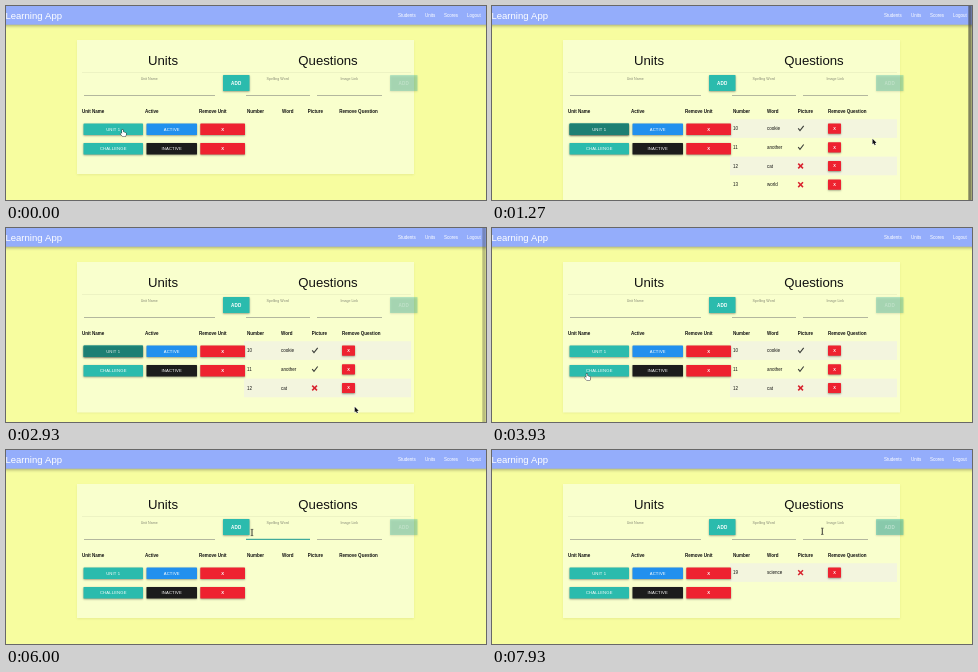
Recreate the animation shown at these times as an HTML page with a canvas. Size 480 px wide and 194 px high, loop 8000 ms.

```html
<!DOCTYPE html>
<html lang="en">
<head>
<meta charset="utf-8">
<title>Learning App</title>
<style>
html, body { margin: 0; width: 100%; height: 100%; overflow: hidden; background: #f7fd9f; }
canvas { display: block; width: 480px; height: 194px; }
</style>
</head>
<body>
<canvas id="stage"></canvas>
<script>
const LOOP = 8000;
const FONT = '"Liberation Sans", Arial, sans-serif';
const TEAL = '#2bbbad', DARK_TEAL = '#1d7f73', RED = '#ee2230', BLUE = '#2290ee', BLACK = '#1c1c1c';

const canvas = document.getElementById('stage');
const ratio = Math.max(1, window.devicePixelRatio || 1);
canvas.width = 480 * ratio;
canvas.height = 194 * ratio;
const ctx = canvas.getContext('2d');

const clamp = v => Math.min(1, Math.max(0, v));
const ramp = (t, from, to) => clamp((t - from) / (to - from));
const ease = k => k * k * (3 - 2 * k);

function rect(x, y, w, h, fill) {
  ctx.fillStyle = fill;
  ctx.fillRect(x, y, w, h);
}

function text(str, x, y, size, { color = '#111', bold = false, align = 'left', spacing = 0 } = {}) {
  ctx.font = `${bold ? 'bold ' : ''}${size}px ${FONT}`;
  ctx.letterSpacing = spacing + 'px';
  ctx.textAlign = align;
  ctx.fillStyle = color;
  ctx.fillText(str, x, y);
}

function line(points, color, width) {
  ctx.beginPath();
  points.forEach(([x, y]) => ctx.lineTo(x, y));
  ctx.strokeStyle = color;
  ctx.lineWidth = width;
  ctx.stroke();
}

function shadowed(color, blur, dy, draw) {
  ctx.save();
  ctx.shadowColor = color;
  ctx.shadowBlur = blur * ratio;
  ctx.shadowOffsetY = dy * ratio;
  draw();
  ctx.restore();
}

function button(label, x, y, w, h, fill, { bold = false, size = 4.2, glow = 0 } = {}) {
  shadowed('rgba(0,0,0,.4)', 2, 0.8, () => {
    ctx.fillStyle = fill;
    ctx.beginPath();
    ctx.roundRect(x, y, w, h, 0.6);
    ctx.fill();
  });
  if (glow) rect(x, y, w, h, `rgba(255,255,255,${glow})`);
  text(label, x + w / 2, y + h / 2 + size * 0.36, size, { color: '#fff', bold, align: 'center', spacing: 0.15 });
}

// A color overlay blends between the resting and the focused button
function unitButton(label, y, focus) {
  button(label, 77.5, y, 59.5, 11.5, TEAL);
  if (!focus) return;
  ctx.save();
  ctx.globalAlpha = focus;
  button(label, 77.5, y, 59.5, 11.5, DARK_TEAL);
  ctx.restore();
}

function drawNav() {
  shadowed('rgba(0,0,0,.3)', 3, 1, () => rect(-10, -10, 500, 28.7, '#94adfb'));
  text('Learning App', -0.5, 12.7, 9.5, { color: '#fff' });
  [['Students', 392], ['Units', 419], ['Scores', 438], ['Logout', 461]]
    .forEach(([label, x]) => text(label, x, 11, 4.53, { color: '#fff' }));
}

function drawForm(t) {
  text('Units', 157, 58.5, 13.2, { align: 'center' });
  text('Questions', 322, 58.5, 13.2, { align: 'center' });
  rect(76, 66, 329, 0.7, 'rgba(0,0,0,.07)');

  [['Unit Name', 143.2, 78, 209], ['Spelling Word', 271.7, 240, 304], ['Image Link', 343.3, 311, 376]]
    .forEach(([label, center, from, to]) => {
      text(label, center, 74, 3.6, { color: '#858875', align: 'center' });
      rect(from, 89, to - from, 0.7, '#96998a');
    });

  if (t >= 5300 && t < 7500) rect(240, 88.8, 64, 1, '#26a69a');
  if (t < 7870) text('science'.slice(0, Math.ceil(ramp(t, 6030, 6470) * 7)), 240.3, 84, 4.53);

  button('ADD', 217, 69, 26.5, 16, TEAL, { bold: true, size: 4.6 });
  ctx.save();
  ctx.globalAlpha = 0.3 + 0.7 * (ramp(t, 6730, 7000) - ramp(t, 7850, 7950));
  const pressed = t > 7470 && t < 7640 ? 0.25 : 0;
  button('ADD', 384, 69, 27.5, 16, TEAL, { bold: true, size: 4.6, glow: pressed });
  ctx.restore();
}

function drawUnits(t) {
  const unitFocus = ramp(t, 390, 530) - ramp(t, 2900, 3070);
  const challengeFocus = ramp(t, 4130, 4260) - ramp(t, 5270, 5420);
  unitButton('UNIT 1', 117.5, unitFocus);
  unitButton('CHALLENGE', 137, challengeFocus);
  button('ACTIVE', 140.5, 117.5, 50.5, 11.5, BLUE);
  button('INACTIVE', 140.5, 137, 50.5, 11.5, BLACK);
  [117.5, 137].forEach(y => button('X', 194.3, y, 44.7, 11.5, RED, { bold: true }));
}

function questionsAt(t) {
  if (t >= 7870) return [[19, 'science', false]];
  if (t < 470 || t >= 4530) return [];
  const rows = [[10, 'cookie', true], [11, 'another', true], [12, 'cat', false], [13, 'world', false]];
  return t < 2930 ? rows : rows.slice(0, 3);
}

function drawQuestions(t, rows) {
  const columns = rows.length ? [241, 275, 305.7, 336] : [241, 276, 301.7, 333.3];
  ['Unit Name', 'Active', 'Remove Unit', 'Number', 'Word', 'Picture', 'Remove Question']
    .forEach((label, i) => text(label, [76, 139, 193, ...columns][i], 107, 4.53, { bold: true }));

  rows.forEach(([number, word, hasPicture], i) => {
    const y = 122.6 + i * 18.7;
    if (i % 2 === 0) rect(238, y - 9.4, 167, 18.7, '#f3f5de');
    text(number, 241, y + 1.6, 4.53);
    text(word, 275, y + 1.6, 4.53);
    if (hasPicture) {
      line([[306.2, y - 0.2], [308, y + 2.1], [311.7, y - 2.8]], '#3c3f3a', 1.1);
    } else {
      line([[306.2, y - 2.4], [311, y + 2.4]], '#d8232f', 1.5);
      line([[311, y - 2.4], [306.2, y + 2.4]], '#d8232f', 1.5);
    }
    const clicked = i === 3 && t > 2200 ? 0.3 * (1 - ramp(t, 2270, 2530)) : 0;
    button('X', 336, y - 5.1, 13, 10.2, RED, { bold: true, size: 3.9, glow: clicked });
  });
}

// Pointer stops: time, x, y
const path = [
  [0, 116, 123.5], [470, 116, 123.5], [1270, 380.5, 132.7], [2070, 348.7, 178.7], [3250, 348.7, 178.7],
  [3930, 94.3, 145.5], [4470, 94.3, 145.5], [4800, 257, 88], [5130, 246, 82.5], [6700, 246, 82.5],
  [7200, 398, 77], [7850, 398, 77], [7925, 330.3, 81.3], [8000, 330.3, 81.3]
];
// Pointer shapes, each from its start time
const shapes = [
  [0, 'hand'], [530, 'arrow'], [3870, 'hand'], [4540, 'arrow'], [4730, 'beam'],
  [6800, 'arrow'], [7100, 'hand'], [7870, 'beam']
];

function outline(points, fill, stroke) {
  ctx.beginPath();
  points.forEach(([x, y]) => ctx.lineTo(x, y));
  ctx.closePath();
  ctx.lineWidth = 0.9;
  ctx.strokeStyle = stroke;
  ctx.stroke();
  ctx.fillStyle = fill;
  ctx.fill();
}

function drawPointer(t) {
  const i = path.findIndex(stop => t < stop[0]);
  const [t0, x0, y0] = path[i - 1], [t1, x1, y1] = path[i];
  const k = ease(ramp(t, t0, t1));
  const shape = shapes.filter(([start]) => t >= start).pop()[1];
  ctx.save();
  ctx.lineJoin = 'round';
  ctx.translate(x0 + (x1 - x0) * k, y0 + (y1 - y0) * k);
  if (shape === 'arrow') {
    outline([[0, 0], [0, 5.6], [1.3, 4.5], [2.2, 6.6], [3.2, 6.1], [2.3, 4.2], [4, 4]], '#111', '#fff');
  } else if (shape === 'hand') {
    outline([[0, 0.2], [1, 0.2], [1.3, 2.6], [3.8, 3.2], [4.2, 4.2], [3.5, 7], [0.6, 7],
      [-1.6, 4.2], [-0.9, 3.6], [0.1, 4.2]], '#fff', '#222');
  } else {
    line([[0, -3], [0, 3]], '#222', 0.9);
    line([[-1.3, -3.1], [1.3, -3.1]], '#222', 0.6);
    line([[-1.3, 3.1], [1.3, 3.1]], '#222', 0.6);
  }
  ctx.restore();
}

function drawScrollbar(t) {
  const alpha = 0.6 * (ramp(t, 470, 600) - ramp(t, 2870, 3000));
  if (alpha) rect(476.3, 0, 3.4, 194, `rgba(50,50,50,${alpha})`);
}

function draw(now) {
  const t = now % LOOP;
  const rows = questionsAt(t);
  ctx.setTransform(ratio, 0, 0, ratio, 0, 0);
  rect(0, 0, 480, 194, '#f7fd9f');
  const bottom = { 4: 203, 3: 184.5 }[rows.length] || 168;
  shadowed('rgba(120,130,40,.12)', 2, 0.5, () => rect(71, 34, 337, bottom - 34, '#f9ffcd'));
  drawNav();
  drawQuestions(t, rows);
  drawUnits(t);
  drawForm(t);
  drawScrollbar(t);
  drawPointer(t);
  requestAnimationFrame(draw);
}
requestAnimationFrame(draw);
</script>
</body>
</html>
```
